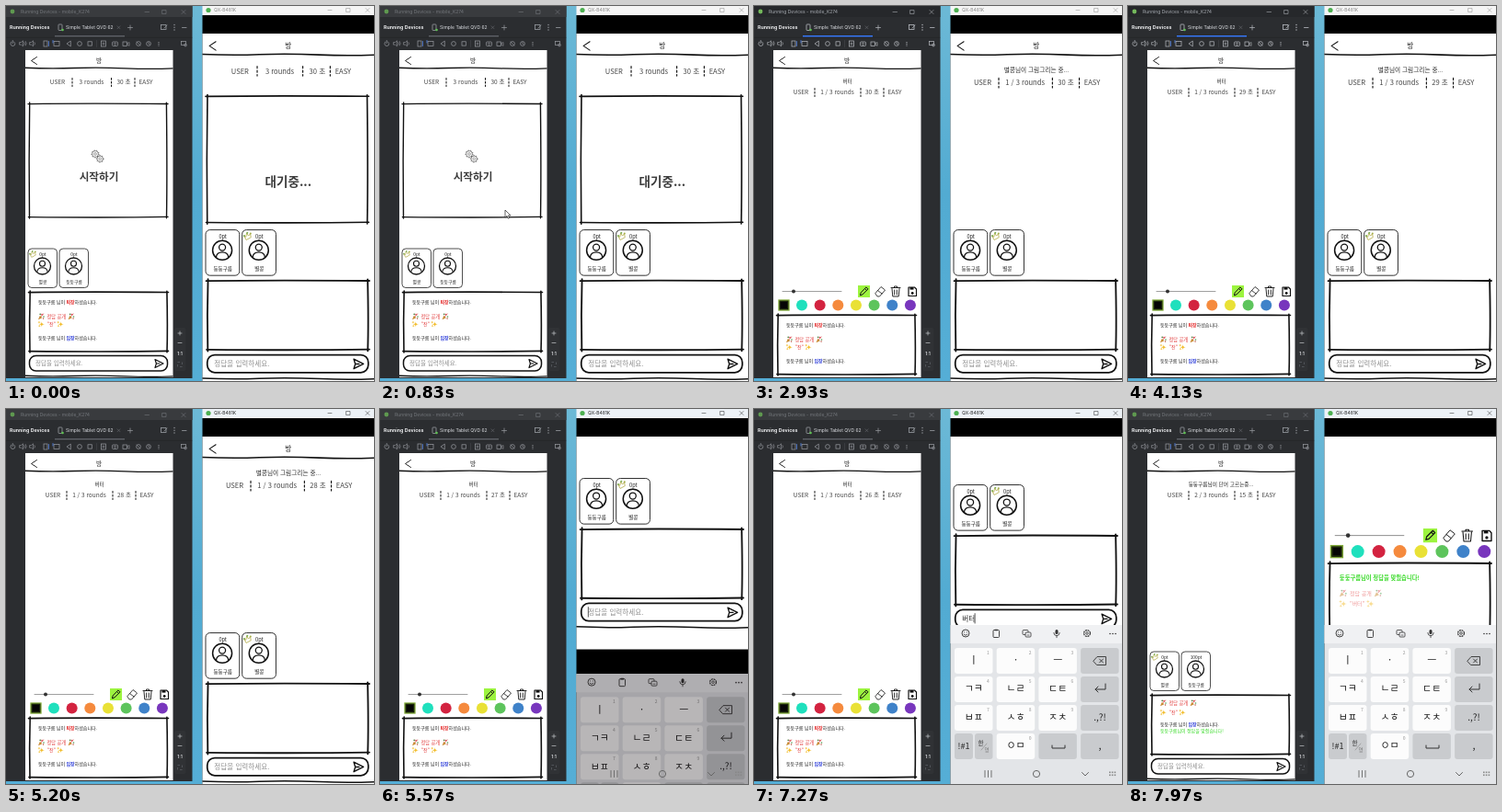
These frames come from a looping animation (400x408 px, 8 s). An HTML page:

```html
<!DOCTYPE html>
<html lang="ko">
<head>
<meta charset="utf-8">
<style>
html, body { margin: 0; width: 100%; height: 100%; overflow: hidden; background: #55acd3; }
svg { display: block; width: 100vw; height: 100vh; }
text { font-family: 'Noto Sans CJK KR', 'Noto Sans CJK', 'Noto Sans', sans-serif; white-space: pre; }
.ui text { font-family: Inter, 'Open Sans', sans-serif; }
</style>
</head>
<body>
<svg id="stage" viewBox="0 0 400 408" preserveAspectRatio="none">
  <defs>
    <linearGradient id="sky" x2="0" y2="1">
      <stop offset="0" stop-color="#6cb9d6"/><stop offset=".5" stop-color="#52abd2"/><stop offset="1" stop-color="#55aed6"/>
    </linearGradient>
    <clipPath id="clipL"><rect x="21" y="48" width="160.5" height="356"/></clipPath>
    <clipPath id="clipR"><rect id="viewR" x="213.5" y="30" width="187" height="378"/></clipPath>
  </defs>
  <rect width="400" height="408" fill="url(#sky)"/>
  <g id="ide" class="ui"></g>
  <g clip-path="url(#clipL)"><rect x="21" y="48" width="161" height="356" fill="#fff"/><g id="left"></g></g>
  <g id="frame" class="ui"></g>
  <g clip-path="url(#clipR)"><rect x="213" y="30" width="187" height="378" fill="#fff"/><g id="right"></g></g>
  <g id="keys"></g>
  <path id="mouse" d="M0 0V8.2L2 6.4L3.4 9.2L4.7 8.5L3.4 5.9H6Z" fill="#fff" stroke="#222" stroke-width=".7"/>
</svg>
<script>
const LOOP = 8000;
const START = 1550, PICK = 2550, FOCUS = 5000, KEYS = 5470, ANSWER = 7560, REVEAL = 7860;
const K = 1.167;
const DRAWER = '별콩', GUESSER = '둥둥구름';
const COLORS = ['#1fe0bd', '#d32340', '#f58a3d', '#e9e136', '#5dc45c', '#3f82c9', '#7836bd'];
const $ = id => document.getElementById(id);
const clamp = v => Math.max(0, Math.min(1, v));

const text = (x, y, size, s, o = {}) =>
  `<text x="${x}" y="${y + size * .36}" font-size="${size}" font-weight="${o.w || 400}" fill="${o.c || '#222'}" text-anchor="${o.a || 'middle'}">${s}</text>`;
const startText = (x, y, size, s, o = {}) => text(x, y, size, s, { ...o, a: 'start' });
const line = (d, w = 1, c = '#111', extra = '') =>
  `<path d="${d}" fill="none" stroke="${c}" stroke-width="${w}" stroke-linecap="round" stroke-linejoin="round" ${extra}/>`;
const rect = (x, y, w, h, fill, extra = '') =>
  `<rect x="${x}" y="${y}" width="${w}" height="${h}" fill="${fill}" ${extra}/>`;
const box = (x, y, w, h, c, s = .8, extra = '') => rect(x, y, w, h, 'none', `stroke="${c}" stroke-width="${s}" ${extra}`);
const dot = (x, y, r, fill, extra = '') => `<circle cx="${x}" cy="${y}" r="${r}" fill="${fill}" ${extra}/>`;
const ring = (x, y, r, w, c = '#111', extra = '') => dot(x, y, r, 'none', `stroke="${c}" stroke-width="${w}" ${extra}`);
const at = (x, y, body) => `<g transform="translate(${x} ${y})">${body}</g>`;

// Hand-drawn frame: four uneven strokes that overshoot the corners
function rough(x, y, w, h, s = 1.4) {
  const r = x + w, b = y + h;
  return line(`M${x - 1} ${y + .6}Q${x + w * .4} ${y - .3} ${r + 1} ${y + .5}`, s) +
    line(`M${x + .7} ${y - 1}Q${x - .3} ${y + h * .5} ${x + .5} ${b + 1}`, s) +
    line(`M${r - .6} ${y - .8}Q${r + .3} ${y + h * .6} ${r - .5} ${b + .8}`, s) +
    line(`M${x - .6} ${b - .4}Q${x + w * .6} ${b + .4} ${r + 1} ${b - .6}`, s);
}
const wave = y => line(`M20 ${y - .3}Q48 ${y + 1} 74 ${y}T130 ${y + .3}T190 ${y}`, 1.3);

function header() {
  return line('M33.5 55.5L27.5 59.5L33.5 63.5', .9) + text(101, 59.3, 6.6, '방') + wave(67.5);
}

function info(y, xs, rounds, secs) {
  const [a, b, c, d, e, f, g] = xs;
  const row = [[a, 'USER'], [c, rounds], [e, secs + ' 초'], [g, 'EASY']];
  return row.map(([x, s]) => text(x, y, 6.5, s, { w: 300, c: '#444' })).join('') +
    [b, d, f].map(x => line(`M${x} ${y - 4.5}v9`, 1, '#111', 'stroke-dasharray="1.8 2"')).join('');
}
const LOBBY = [56, 72, 93, 114.5, 128, 140, 152];
const GAME = [51, 66, 90.5, 116, 128.5, 141, 153];

function gear(x, y, r) {
  return ring(x, y, r, .6, '#444') + ring(x, y, r * .4, .5, '#444') +
    ring(x, y, r + .6, .8, '#444', 'stroke-dasharray="1.1 1.7"');
}

function canvas(h, label, gears) {
  return rough(25, 106, 150, h) + (gears ? gear(97, 161, 3.4) + gear(102.2, 166.3, 3.2) : '') +
    text(101, 186, 11.6, label, { w: 700, c: '#3c3c3c' });
}

const crown = line('M26 270l1.8 3.4 4.4-2.4-.6-3.4-1.7 2-1.7-2.6-.6 3.3z', .7, '#b3ac4a') +
  dot(26, 269.6, .9, '#7fae55') + dot(28.8, 266.8, .9, '#7fae55') + dot(31.8, 267.3, .9, '#a6b04e');

function card(x, name, pts, king, dim) {
  return `<g opacity="${dim ? .6 : 1}">` +
    rect(x, 264, 31.5, 42.5, '#fff', 'rx="4" stroke="#222" stroke-width=".8"') +
    text(x + 16, 270.5, 4.8, pts) + ring(x + 15.5, 283, 9, 1.3) + ring(x + 15.5, 280.3, 3, 1.1) +
    line(`M${x + 9.8} 289.5q.4-4.7 5.7-4.7t5.7 4.7`, 1.1) + text(x + 16, 300, 4.8, name) +
    (king ? at(x - 24, 0, crown) : '') + '</g>';
}

function popper(x, y) {
  return at(x, y, '<path d="M0 3.2L1.9 -1.2L4.4 1.3Z" fill="#c98b35"/>' + line('M3.4-.6Q4.6-1 5.6-3', .8, '#d23c3c') +
    dot(4, -2.4, .8, '#d8434e') + dot(6, 0, .8, '#4c9c50') + dot(2.2, -2.6, .8, '#4b7f3c') + dot(5.6, 2, .7, '#b8483c'));
}
const star = (x, y, r) =>
  `<path d="M${x} ${y - r}Q${x} ${y} ${x + r} ${y}Q${x} ${y} ${x} ${y + r}Q${x} ${y} ${x - r} ${y}Q${x} ${y} ${x} ${y - r}" fill="#f2bd2d"/>`;
const spark = (x, y) => star(x + 3.8, y + .3, 3.2) + star(x + 1, y - 1.9, 1.7) + star(x + 1.2, y + 2.1, 1.5);

function reveal(y1, y2, word, op = 1) {
  const end = 49 + word.length * 4.8;
  return `<g opacity="${op}">` + popper(35, y1) + startText(44.5, y1, 5.2, '정답 공개', { c: '#e03636' }) + popper(67.5, y1) +
    spark(35, y2) + startText(44.5, y2, 5, `"${word}"`, { c: '#e03636' }) + spark(end + 2, y2) + '</g>';
}
const moved = (y, verb, c) => startText(35, y, 5,
  `${GUESSER} 님이 <tspan fill="${c}" font-weight="700">${verb}</tspan>하셨습니다.`);
const solved = (y, size, w) => startText(35, y, size, `${GUESSER}님이 정답을 맞췄습니다!`, { c: '#34d923', w });

const oldLog = moved(322, '퇴장', '#e32424') + reveal(338, 346, '잔') + moved(361, '입장', '#2536d8');
const newLog = reveal(320, 330, '잔') + moved(343, '입장', '#2536d8') + solved(350, 5, 400);
const chat = (dy, log) => at(0, dy, rough(25.5, 311, 150, 65, 1.6) + log);

function input(value, caret) {
  const x = 32 + value.length * 5.9;
  return rect(25.5, 380.5, 150, 16.5, '#fff', 'rx="7" stroke="#111" stroke-width="1.5"') +
    startText(32, 388.5, 6.5, value || '정답을 입력하세요.', value ? {} : { c: '#909090', w: 300 }) +
    (caret ? line(`M${x} 384v9`, .6) : '') +
    line('M162 384.5L171 389L162 393.5L163.4 389Z M163.4 389H167', 1.2) + wave(402.5);
}

function tools(dy) {
  let s = line('M31 310.5H95', .7, '#777') + dot(43, 310.5, 2, '#333') +
    rect(113, 304, 13, 13, '#9cf43f') + line('M115.5 314.5l.7-2.8 5.8-5.8 2 2-5.8 5.8zM120.5 307.5l2 2', 1) +
    line('M132 312.5l6-7 4.5 3.5-6 7h-2zM134.5 309.5l4.5 3.5', .8) +
    line('M149 306.5h10M152.5 306.5v-1.5h3v1.5M150 307.5l.8 8.5h6.4l.8-8.5M152.7 309v5M155.3 309v5', .9) +
    line('M168 306h6.5l2 2v7.5h-8.5z', 1.2) + rect(169.5, 306, 4, 2.6, '#111') + dot(172.2, 312.5, 1.4, '#111') +
    rect(27, 320, 11, 11, '#050505', 'stroke="#7fa837" stroke-width="1.3"') + box(28.5, 321.5, 8, 8, '#26340f', .6);
  COLORS.forEach((c, i) => s += dot(52 + i * 19.65, 325.5, 6, c));
  return at(0, dy, s);
}

const choice = (x, w, s) => rough(x, 117.5, w, 15, 1) + text(x + w / 2, 125, 7.2, s);
const secondsLeft = t => t < PICK ? 15 : 30 - Math.floor((t - PICK) / 990);

function leftScreen(t) {
  if (t < START) return header() + info(83, LOBBY, '3 rounds', 30) + canvas(124, '시작하기', true) +
    card(24, DRAWER, '0pt', true) + card(58, GUESSER, '0pt') + chat(0, oldLog) + input('');
  if (t < ANSWER) {
    const top = t < PICK
      ? text(101, 82, 5.7, `${DRAWER}님이 단어 고르는중...`) + choice(40.5, 53.5, '버터') + choice(107.5, 54, '냉장고')
      : text(101.5, 82, 5.5, '버터');
    return header() + top + info(94, GAME, '1 / 3 rounds', secondsLeft(t)) + tools(0) + chat(25, oldLog);
  }
  return header() + text(101, 82, 5.7, `${GUESSER}님이 단어 고르는중...`) + info(94, GAME, '2 / 3 rounds', 15) +
    card(24, DRAWER, '0pt', true) + card(58, GUESSER, '100pt') + chat(0, newLog) + input('');
}

// Composition steps: time, field value, key column, key row
const TYPING = [[5980, 'ㅂ', 0, 2], [6130, 'ㅂ·', 1, 0], [6270, '버', 0, 0], [6390, '벋', 2, 1],
  [6620, '벝', 2, 1], [6860, '버ㅌ·', 1, 0], [7060, '버터', 0, 0], [7440, '', -1, 0]];
const lastStep = t => TYPING.filter(s => s[0] <= t).pop();

function rightScreen(t) {
  if (t >= ANSWER) {
    const log = solved(325, 5.4, 700) + (t < REVEAL ? '' : reveal(339.5, 349, '버터', clamp((t - REVEAL) / 220)));
    return tools(-170.3) + chat(-145.3, log);
  }
  const picking = t >= START && t < PICK;
  const top = t < START ? info(83, LOBBY, '3 rounds', 30) + canvas(118.5, '대기중...')
    : text(101, 82, 5.7, `${DRAWER}님이 ${picking ? '단어 고르는중...' : '그림그리는 중...'}`) +
      info(94, GAME, '1 / 3 rounds', secondsLeft(t));
  const step = lastStep(t);
  const body = header() + top + at(0, -33, card(24, GUESSER, '0pt') + card(58, DRAWER, '0pt', true, picking) +
    chat(0, '') + input(step ? step[1] : '', t > KEYS));
  const scroll = t < KEYS ? 0 : drop(t) > 20 ? -144 : -138;
  return at(0, scroll, body);
}

// Remaining distance of the rising keyboard
const drop = t => 173 * Math.pow(1 - clamp((t - KEYS) / 250), 2.28);

const LABELS = [['ㅣ', '·', 'ㅡ'], ['ㄱㅋ', 'ㄴㄹ', 'ㄷㅌ'], ['ㅂㅍ', 'ㅅㅎ', 'ㅈㅊ'], ['', 'ㅇㅁ', '']];
function keyboard(t) {
  if (t < KEYS) return '';
  const off = drop(t), step = lastStep(t);
  const hot = step && t - step[0] < 110 ? step : null;
  const grey = '#c9cbce', ink = '#333';
  let s = rect(213.5, 235, 187, 175, '#e3e5e8') + rect(213.5, 235, 187, 20, '#f0f1f3');
  s += ring(230, 244, 4, .9, ink) + line('M228 245.2q2 2.4 4 0M228.6 242.7v.2M231.4 242.7v.2', .8, ink) +
    box(260, 240.5, 6.5, 8, ink, .9, 'rx="1"') + line('M262 240.5h2.5', 1.6, ink) +
    box(292, 240.5, 6, 5, ink, .8, 'rx="1"') +
    rect(295, 243, 6, 5, '#f0f1f3', `rx="1" stroke="${ink}" stroke-width=".8"`) + line('M297 246h2', .7, ink) +
    rect(327.5, 240, 3, 5, ink, 'rx="1.5"') + line('M325.8 243.5q.2 3.2 3.2 3.2t3.2-3.2M329 246.7v2', .8, ink) +
    ring(362, 244, 3.4, 1.2, ink, 'stroke-dasharray="2 .7"') + ring(362, 244, 1.3, .8, ink) +
    [387, 390, 393].map(x => dot(x, 244.5, .8, ink)).join('');
  for (let r = 0; r < 4; r++) for (let c = 0; c < 4; c++) {
    const x = 218 + c * 45.7, y = 260 + r * 31, side = c === 3 || (r === 3 && c !== 1);
    const fill = hot && hot[2] === c && hot[3] === r ? '#b9bdc3' : side ? grey : '#fcfcfc';
    if (r === 3 && c === 0) {
      s += rect(x, y, 20, 28, grey, 'rx="3"') + rect(x + 22, y, 19.5, 28, grey, 'rx="3"') +
        text(x + 10, y + 14, 9, '!#1') + text(x + 28.5, y + 10.5, 6.5, '한') + text(x + 35, y + 18, 5.5, '영', { c: '#777' }) +
        line(`M${x + 29} ${y + 18}l6-7`, .5, '#777');
      continue;
    }
    s += rect(x, y, 41.5, 28, fill, 'rx="3"');
    if (c < 3) {
      s += text(x + 20.8, y + 13.5, 11, LABELS[r][c]);
      if (r < 3 || c === 1) s += text(x + 36.5, y + 5.5, 5, r === 3 ? 0 : r * 3 + c + 1, { c: '#999' });
    }
  }
  s += line('M369 274l4-4.5h9.5v9h-9.5zM375.5 272l4 4M379.5 272l-4 4', .9, ink) +
    line('M382 299v6h-11M374 302l-3 3 3 3', 1, ink) + text(376, 335, 10, '.,?!') + text(376, 366, 11, ',') +
    line('M324 366v3h14v-3', 1, ink);
  let nav = line('M251 393.5v7M254.5 393.5v7M258 393.5v7', .9, '#666') + ring(307, 397, 3.6, 1, '#666') +
    line('M356.5 395.5l3.5 3.5 3.5-3.5', 1, '#666');
  for (let i = 0; i < 6; i++) nav += rect(386 + i % 3 * 2.8, 394.5 + (i > 2) * 3, 1.6, 1.6, '#888');
  const shade = rect(213.5, 235 + off, 187, 173 - off, '#0a0006', `opacity="${Math.min(.45, off / 190)}"`);
  return at(0, off, s) + (off > .5 ? shade : '') + nav;
}

function ideChrome(active) {
  const c = active ? '#b9bcc2' : '#9a9da3', tone = active ? '#a9adb3' : '#75787d';
  let s = rect(0, 0, 202.5, 405, '#2b2d30') + rect(0, 0, 202.5, 12, active ? '#26282b' : '#393b3e') +
    dot(7, 6, 2.4, active ? '#74b95c' : '#5f9a50') + startText(16, 6.3, 5, 'Running Devices - mobile_K274', { c: tone }) +
    line('M151 6.5h4.5M170 4.5h4v4h-4zM191 4.5l4 4M195 4.5l-4 4', .6, tone) +
    startText(4, 23.3, 5.3, 'Running Devices', { c: '#e9eaec', w: 700 }) +
    box(57, 20, 4, 6.5, c, .8, 'rx=".7"') + dot(61.5, 26, 1.3, '#5fc253') +
    startText(65, 23.3, 5, 'Simple Tablet QVD 62', { c: '#dfe1e5' }) +
    line('M121 21.8l3 3M124 21.8l-3 3', .5, '#74777c') + line('M132.5 23.5h5M135 21v5', .7, c) +
    rect(53, 32, 76, 1.6, active ? '#3574f0' : '#5a5d63') + line('M0 34.3H202', .5, '#1e1f22') +
    box(168.5, 20.5, 5.5, 5, c) + line('M172 24l3-3', .7, c) +
    [20.5, 23.2, 26].map(y => dot(183, y, .7, c)).join('') + line('M191.500 23.5h4.5', .8, c);
  s += line('M5.7 39q-2 2.5.5 4.3q4 .7 3.5-2.8l-1-1.5M7.3 37.5v3', .7, c) +
    [18, 29].map((x, i) => line(`M${x - 3} 39.5h1.5l2-1.7v6l-2-1.7h-1.5zM${x + 2} 39.5q1.3 1.4 0 2.8` +
      (i ? '' : `M${x + 3.3} 38.5q2 2.4 0 4.5`), .6, c)).join('') +
    box(41, 38, 4, 6, c, .7) + line('M46.5 38.5v5', .7, '#548af7') +
    box(52, 38.5, 6, 5, c, .7) + line('M51 37.5v2.5', .8, '#548af7') +
    line('M70 38.3l-4 2.7 4 2.7z', .7, c) + ring(80, 41, 2.4, .7, c) + box(89, 38.8, 4.3, 4.3, c, .7) +
    line('M98.5 37.5v7', .5, '#4a4d52') + box(103.5, 38, 5, 6, c, .7) + ring(106, 41, 1, .6, c) +
    box(115.5, 39, 6, 4.5, c, .7, 'rx="1"') + ring(118.5, 41.3, 1.1, .6, c) +
    box(127, 39, 4.5, 4.5, c, .7) + line('M131.5 41l2.5-1.5v3.5z', .6, c) +
    ring(144, 41, 2.4, .7, c) + line('M142 39l4 4', .6, c) + ring(155, 41, 2.4, .7, c) + line('M155 39.5v1.7l1.3.8', .6, c) +
    [39.5, 41.2, 43].map(y => dot(166, y, .6, c)).join('') + box(190.500, 38.5, 5, 4, c, .7) + ring(195, 42.5, 1.4, .7, c);
  return s + rect(183, 350, 12.5, 47, '#303235', 'rx="2"') +
    line('M187 356h4M189 354v4M187 366.5h4', .7, '#c5c7cb') + text(189, 378, 4.8, '1:1', { c: '#dcdde0', w: 600 }) +
    box(186.5, 387.5, 5, 5, '#5f6268', .7, 'stroke-dasharray="2.5 2.5"');
}

function deviceChrome(focused) {
  const c = focused ? '#222' : '#888';
  return rect(213.5, 0, 187, 10, focused ? '#edf2f7' : '#f5f5f5') + dot(220, 4.5, 2.6, '#4caf50') +
    startText(226, 4.3, 5, 'QX-B481K', { c }) +
    line('M350 4.5h4M370 2.5h4v4h-4zM391 2.5l4 4M395 2.5l-4 4', .5, c) + rect(213.5, 10, 187, 398, '#000');
}

// Redraw a layer only when its markup changes
const drawn = {};
function put(id, html) {
  if (drawn[id] !== html) $(id).innerHTML = drawn[id] = html;
}

const PATH = [[480, 212, 296], [810, 136, 222], [1150, 103, 187], [1480, 103, 187]];
function moveMouse(t) {
  const i = PATH.findIndex(p => p[0] > t);
  $('mouse').style.display = i < 1 ? 'none' : '';
  if (i < 1) return;
  const [a, b] = [PATH[i - 1], PATH[i]];
  // Rest briefly before heading to the button
  const from = i === 2 ? 900 : a[0];
  const p = clamp((t - from) / (b[0] - from)), e = p * p * (3 - 2 * p);
  $('mouse').setAttribute('transform', `translate(${a[1] + (b[1] - a[1]) * e} ${a[2] + (b[2] - a[2]) * e})`);
}

function render(t) {
  put('ide', ideChrome(t > 1450 && t < FOCUS));
  put('left', leftScreen(t));
  put('frame', deviceChrome(t >= FOCUS));
  $('viewR').setAttribute('height', t < KEYS ? 378 : 205 + drop(t) / 2);
  put('right', `<g transform="translate(189 -26) scale(${K})">${rightScreen(t)}</g>`);
  put('keys', keyboard(t));
  moveMouse(t);
}

const begin = performance.now();
function tick() {
  render((performance.now() - begin) % LOOP);
  requestAnimationFrame(tick);
}
tick();
</script>
</body>
</html>
```
